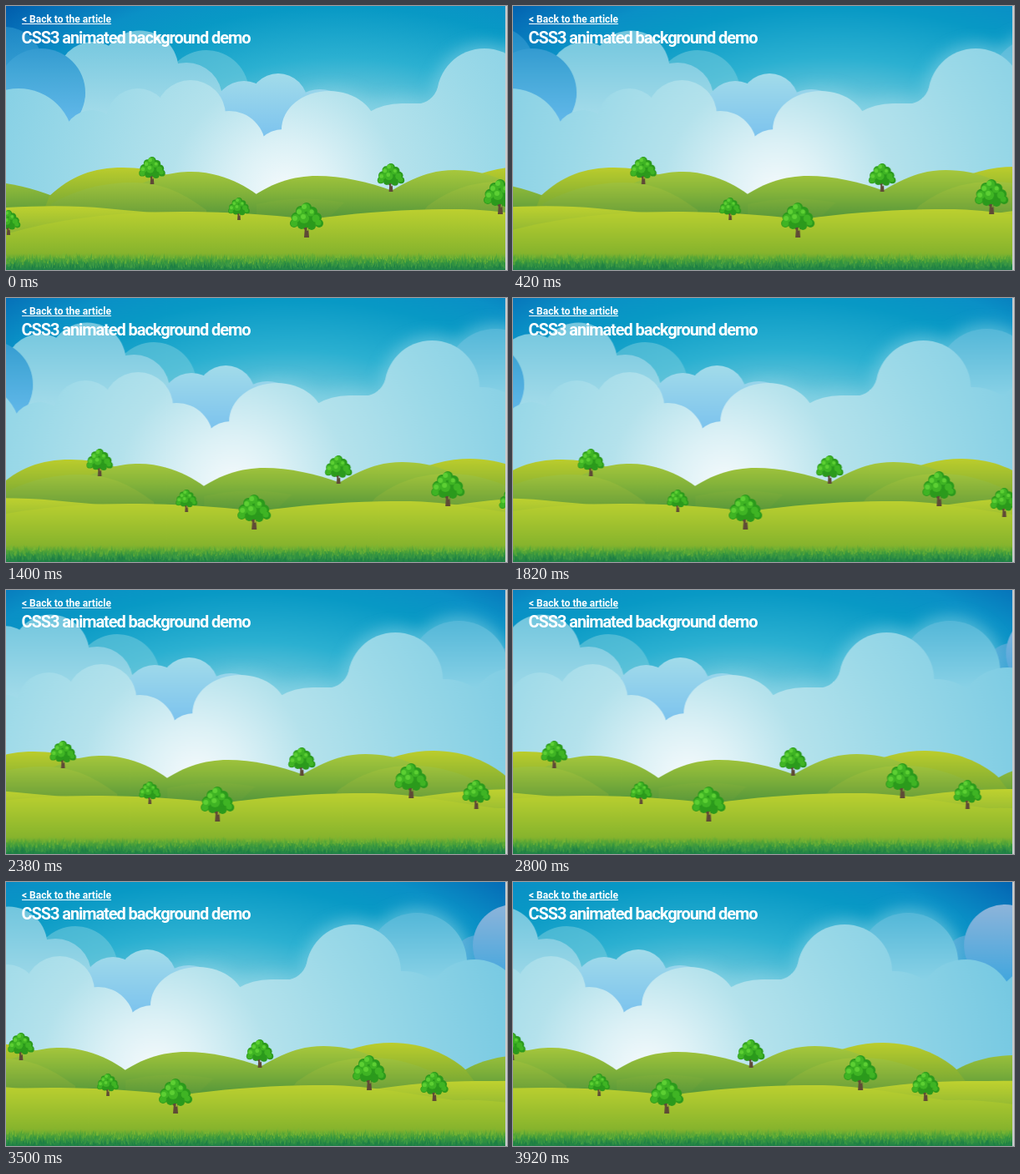
An HTML page for the animation above (4.06 s loop, 600 px wide and 317 px high).

```html
<!DOCTYPE html>
<html lang="en">
<head>
<meta charset="utf-8">
<title>CSS3 animated background demo</title>
<style>
  html, body { margin: 0; width: 100%; height: 100%; overflow: hidden; }
  .stage { position: relative; width: 600px; height: 317px; overflow: hidden; background: #0a9cc7; }
  .scene { position: absolute; left: 0; top: 0; animation: drift 4060ms steps(29) infinite; }
  @keyframes drift { to { transform: translateX(-182.1px); } }
  .back, h1 { position: absolute; left: 19px; margin: 0; color: #fff; white-space: nowrap; font-family: Roboto, sans-serif; font-weight: 700; }
  .back { top: 9px; font-size: 12px; line-height: 14px; text-decoration: underline; }
  h1 { left: 18.5px; top: 26px; font-size: 20px; line-height: 24px; letter-spacing: -1.08px; }
  .bar { position: absolute; right: 0; top: 0; width: 2px; height: 317px; background: #c9cccd; }
</style>
</head>
<body>
<div class="stage">
  <svg class="scene" width="800" height="317" viewBox="0 0 800 317">
    <defs>
      <radialGradient id="sky" gradientUnits="userSpaceOnUse" cx="0" cy="0" r="1" gradientTransform="translate(400 200) scale(537 300)">
        <stop offset="0" stop-color="#eef9fc"/>
        <stop offset=".18" stop-color="#9fdce8"/>
        <stop offset=".33" stop-color="#5cc1d9"/>
        <stop offset=".46" stop-color="#2bb0d1"/>
        <stop offset=".66" stop-color="#0899c5"/>
        <stop offset=".78" stop-color="#0a90c6"/>
        <stop offset=".92" stop-color="#0670b8"/>
        <stop offset="1" stop-color="#005cab"/>
      </radialGradient>
      <radialGradient id="cloud" gradientUnits="userSpaceOnUse" cx="335" cy="225" r="460">
        <stop offset="0" stop-color="#f5fafc"/>
        <stop offset=".13" stop-color="#dcf1f6"/>
        <stop offset=".3" stop-color="#b4e2ec"/>
        <stop offset=".55" stop-color="#9bd9e8"/>
        <stop offset="1" stop-color="#74c8e2"/>
      </radialGradient>
      <linearGradient id="blue" gradientUnits="userSpaceOnUse" x1="0" y1="25" x2="0" y2="140">
        <stop offset="0" stop-color="#2590cb"/>
        <stop offset=".5" stop-color="#45a8d8"/>
        <stop offset="1" stop-color="#62b8ea"/>
      </linearGradient>
      <linearGradient id="dusk" gradientUnits="userSpaceOnUse" x1="0" y1="27" x2="0" y2="122">
        <stop offset="0" stop-color="#8db4da"/>
        <stop offset="1" stop-color="#3fa6de"/>
      </linearGradient>
      <linearGradient id="mid" gradientUnits="userSpaceOnUse" x1="0" y1="80" x2="0" y2="157">
        <stop offset="0" stop-color="#a3dcea"/>
        <stop offset="1" stop-color="#7cc3ee"/>
      </linearGradient>
      <linearGradient id="pale" gradientUnits="userSpaceOnUse" x1="0" y1="30" x2="0" y2="135">
        <stop offset="0" stop-color="#72c6de"/>
        <stop offset="1" stop-color="#a5dcea"/>
      </linearGradient>
      <linearGradient id="high" gradientUnits="userSpaceOnUse" x1="0" y1="30" x2="0" y2="135">
        <stop offset="0" stop-color="#4fb5d7"/>
        <stop offset="1" stop-color="#94d7e9"/>
      </linearGradient>
      <filter id="blur" x="-20%" y="-20%" width="140%" height="140%"><feGaussianBlur stdDeviation="9"/></filter>
      <linearGradient id="hill" gradientUnits="userSpaceOnUse" x1="0" y1="195" x2="0" y2="255">
        <stop offset="0" stop-color="#aac93c"/>
        <stop offset=".5" stop-color="#82b23a"/>
        <stop offset="1" stop-color="#54963a"/>
      </linearGradient>
      <linearGradient id="warm" gradientUnits="userSpaceOnUse" x1="0" y1="193" x2="0" y2="250">
        <stop offset="0" stop-color="#bccd2c"/>
        <stop offset="1" stop-color="#6da336"/>
      </linearGradient>
      <linearGradient id="knoll" gradientUnits="userSpaceOnUse" x1="0" y1="211" x2="0" y2="252">
        <stop offset="0" stop-color="#a0c23c"/>
        <stop offset="1" stop-color="#6a9f39"/>
      </linearGradient>
      <linearGradient id="far" gradientUnits="userSpaceOnUse" x1="0" y1="239" x2="0" y2="272">
        <stop offset="0" stop-color="#c0d22f"/>
        <stop offset="1" stop-color="#8fb733"/>
      </linearGradient>
      <linearGradient id="field" gradientUnits="userSpaceOnUse" x1="0" y1="243" x2="0" y2="300">
        <stop offset="0" stop-color="#bdd02f"/>
        <stop offset=".35" stop-color="#a9c62f"/>
        <stop offset="1" stop-color="#83b22d"/>
      </linearGradient>
      <linearGradient id="turf" x1="0" y1="0" x2="0" y2="1">
        <stop offset="0" stop-color="#6aab32" stop-opacity="0"/>
        <stop offset=".4" stop-color="#469d3a"/>
        <stop offset="1" stop-color="#1f8248"/>
      </linearGradient>
      <g id="tree">
        <path d="M-3 0-2-13H2L3 0ZM-1-8-8-15-6-16 1-10ZM1-8 8-15 6-16-1-10Z" fill="#5f4a36"/>
        <g fill="#2b9a1c">
          <circle cy="-24" r="12"/><circle cy="-36" r="6"/>
          <circle cx="-7" cy="-32" r="6"/><circle cx="7" cy="-31" r="6"/>
          <circle cx="-12" cy="-24" r="6.5"/><circle cx="12" cy="-24" r="6"/>
          <circle cx="-15" cy="-17" r="5"/><circle cx="15" cy="-17" r="5"/>
          <circle cx="-6" cy="-15" r="5"/><circle cx="6" cy="-14" r="5"/>
        </g>
        <g fill="#3fb424">
          <circle cx="-1" cy="-36" r="5"/><circle cx="-7" cy="-31" r="5"/>
          <circle cx="5" cy="-30" r="4.5"/><circle cx="-13" cy="-23" r="5"/>
          <circle cx="-3" cy="-23" r="6"/><circle cx="11" cy="-23" r="4.5"/>
          <circle cx="-15" cy="-17" r="4"/><circle cx="14" cy="-18" r="3.5"/>
        </g>
        <g fill="#5ccf33">
          <circle cx="-3" cy="-37" r="3"/><circle cx="-9" cy="-31" r="3"/>
          <circle cx="-14" cy="-23" r="3"/><circle cx="-4" cy="-25" r="3"/><circle cx="6" cy="-31" r="2.5"/>
        </g>
      </g>
    </defs>

    <rect width="800" height="317" fill="url(#sky)"/>

    <g fill="#8ad4e6" opacity=".55" filter="url(#blur)">
      <circle cx="573" cy="108" r="63"/>
      <circle cx="649" cy="97" r="66"/>
      <ellipse cx="474" cy="150" rx="65" ry="40"/>
      <ellipse cx="387" cy="148" rx="62" ry="50"/>
    </g>
    <circle cx="-2" cy="71" r="46" fill="url(#blue)" opacity=".75"/>
    <circle cx="240" cy="104" r="51" fill="#7fd0e0" opacity=".5"/>
    <g fill="url(#dusk)">
      <circle cx="722" cy="94" r="30" opacity=".6"/>
      <circle cx="765" cy="76" r="49"/>
      <path d="M722 90H800V140H722Z"/>
    </g>
    <g fill="url(#pale)">
      <circle cx="104" cy="85" r="42"/>
      <circle cx="160" cy="76" r="46.5"/>
      <circle cx="216" cy="111" r="43"/>
      <path d="M70 95H216V170H70Z"/>
    </g>
    <circle cx="649" cy="97" r="60" fill="url(#high)"/>
    <path d="M0 105A53 53 0 0 1 95 104Q94 122 78 150H0Z" fill="url(#blue)"/>
    <circle cx="42" cy="104" r="53" fill="url(#blue)"/>
    <g fill="url(#mid)">
      <circle cx="285" cy="126" r="36"/>
      <circle cx="326" cy="116" r="35"/>
      <ellipse cx="376" cy="124" rx="32" ry="24"/>
      <path d="M250 125H350V170H250Z"/>
    </g>
    <g fill="url(#cloud)">
      <circle cx="15" cy="165" r="66"/>
      <circle cx="103" cy="160" r="35"/>
      <circle cx="158" cy="137" r="38"/>
      <circle cx="221" cy="131" r="42"/>
      <circle cx="267" cy="170" r="44"/>
      <circle cx="332" cy="185" r="37"/>
      <ellipse cx="387" cy="148" rx="57" ry="46"/>
      <ellipse cx="474" cy="152" rx="55" ry="35"/>
      <path d="M474 117H497Q512 113 517 98L560 160H474Z"/>
      <circle cx="573" cy="108" r="57"/>
      <ellipse cx="632" cy="152" rx="56" ry="45"/>
      <ellipse cx="718" cy="150" rx="58" ry="57"/>
      <circle cx="815" cy="165" r="66"/>
      <path d="M0 158H266L309 157 332 148H800V260H0Z"/>
      <path d="M545 125H640V170H545Z"/>
    </g>

    <g fill="url(#hill)">
      <path d="M0 213Q35 218 80 238V260H0Z"/>
      <path d="M685 242C705 222 735 209 775 208H800V260H685Z"/>
      <path d="M52 228C78 204 104 194 140 194C178 194 220 208 262 240V260H40Z" fill="url(#warm)"/>
      <path d="M150 220C178 204 200 199 222 199C252 199 280 211 300 226L330 260H140Z"/>
      <path d="M285 236C316 212 345 204 372 204C402 204 434 211 463 222L500 260H270Z"/>
      <path d="M535 215C565 200 592 193 619 193C656 193 686 207 706 224L734 260H530Z" fill="url(#warm)"/>
      <path d="M385 252Q430 240 463 221C488 206 510 197 537 197C577 197 610 212 645 240V260H380Z"/>
    </g>
    <g fill="url(#knoll)">
      <path d="M55 237C88 219 118 212 152 212C190 212 215 227 240 245V260H40Z"/>
      <path d="M505 240C535 218 562 211 593 211C630 211 660 222 700 245V260H490Z"/>
      <path d="M300 238Q350 226 405 236L385 256H300Z" opacity=".35"/>
    </g>
    <g fill="url(#far)">
      <path d="M0 242Q70 238 120 243T210 250V317H0Z"/>
      <path d="M590 250Q660 239 720 239T800 238V317H590Z"/>
    </g>
    <g fill="url(#field)">
      <path d="M676 264Q720 257 800 271V317H676Z"/>
      <path d="M0 274C60 256 130 247 210 247C280 247 330 252 380 258V317H0Z"/>
      <path d="M345 259C410 249 470 244 540 244C610 244 660 262 800 274V317H345Z"/>
    </g>
    <g id="trees"></g>
    <rect y="297" width="800" height="20" fill="url(#turf)"/>
    <g id="grass"></g>
  </svg>
  <a class="back">&lt; Back to the article</a>
  <h1>CSS3 animated background demo</h1>
  <div class="bar"></div>
</div>
<script>
  // x, base y, height
  const trees = [[3, 275, 30], [175, 214, 33], [279, 257, 27], [360, 278, 42],
                 [461, 223, 34], [592, 250, 42], [670, 263, 35]];
  document.getElementById('trees').innerHTML = trees.map(([x, y, h]) =>
    `<use href="#tree" transform="translate(${x} ${y}) scale(${h / 42})"/>`).join('');

  let seed = 7;
  const rand = (lo, hi) => {
    seed = (seed * 16807) % 2147483647;
    return lo + (hi - lo) * seed / 2147483647;
  };
  const blade = depth => {
    const x = rand(0, 800), y = rand(302, 306) + depth * 2.4, h = rand(5, 9), lean = rand(-2.5, 2.5);
    return `M${(x - .8).toFixed(1)} ${y.toFixed(1)}l${(.8 + lean).toFixed(1)} ${-h.toFixed(1)} ${(.8 - lean).toFixed(1)} ${h.toFixed(1)}z`;
  };
  // back row to front row
  const greens = ['#7ab733', '#4fa437', '#63ae36', '#2f9340', '#3f9c44', '#1d7f44'];
  document.getElementById('grass').innerHTML = greens.map((c, i) =>
    `<path fill="${c}" d="${Array.from({ length: 360 }, () => blade(i)).join('')}"/>`).join('');
</script>
</body>
</html>
```
